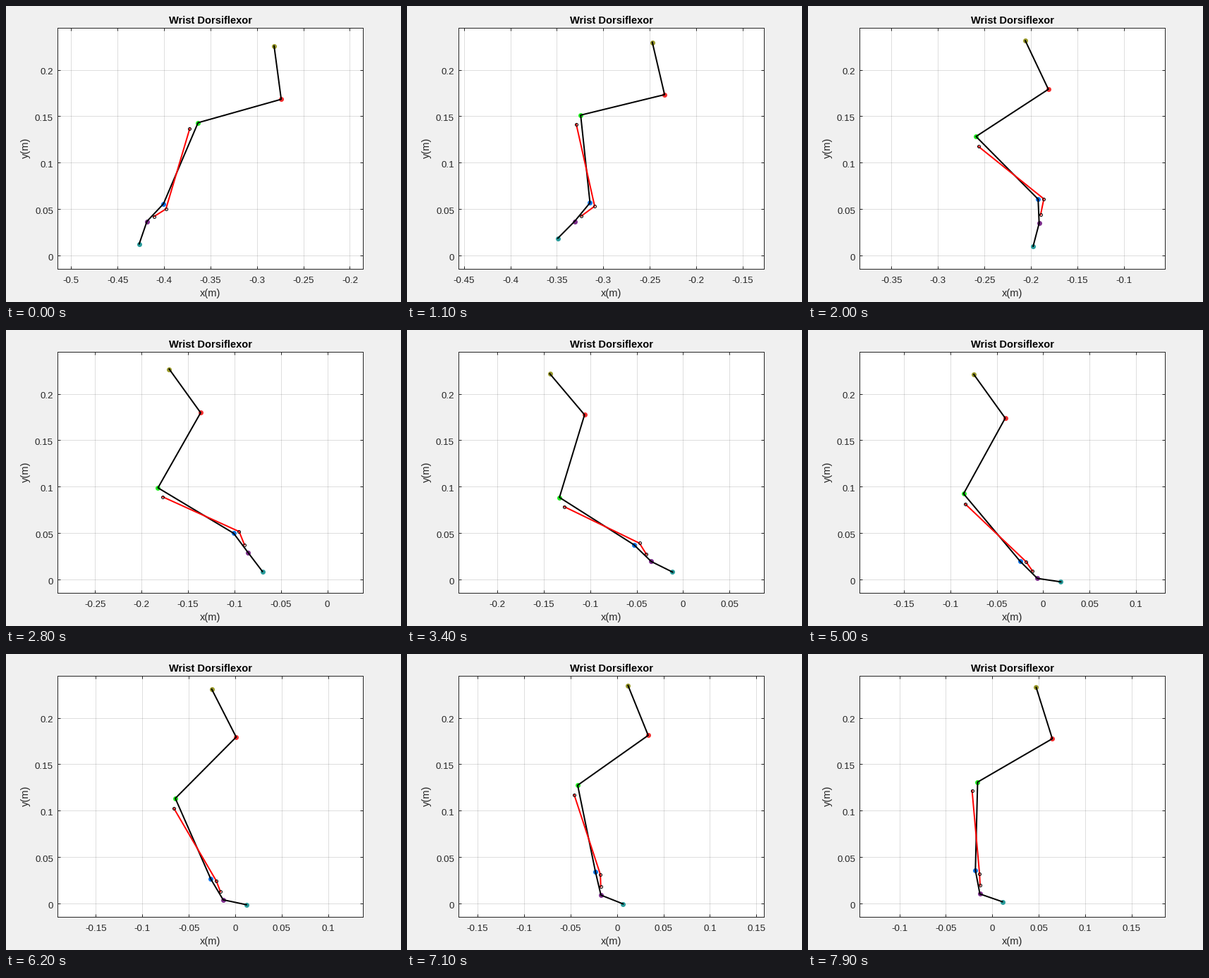
These frames come from a looping animation (560 px wide and 420 px high, 8000 ms). A matplotlib script:

```python
import numpy as np
import matplotlib.pyplot as plt
from matplotlib.animation import FuncAnimation
from matplotlib.ticker import FuncFormatter, MultipleLocator

W, H, DPI = 560, 420, 80
PT = 72 / DPI                     # points per pixel
LEFT, RIGHT, TOP, BOTTOM = 73, 506, 31, 373
SCALE, ZERO_Y = 1317, 354         # pixels per metre, pixel row of y = 0
SPAN = (RIGHT - LEFT) / SCALE
FRAMES, HOLD = 80, 4
STRIDE, STRIDE_LENGTH = 100, .4556    # frames and metres per stride
INK = (.15, .15, .15)


def wave(phase, mean, *harmonics):
    """Sum of harmonics of one stride, each an (amplitude, lag in degrees)."""
    return mean + sum(amp * np.cos(np.radians(360 * k * phase - lag))
                      for k, (amp, lag) in enumerate(harmonics, 1))


def step(start, length, deg):
    a = np.radians(deg)
    return start + length * np.array([np.cos(a), np.sin(a)])


def limb(t):
    """Joint positions and muscle path after t frames of the stride."""
    p = t / STRIDE
    shoulder = np.array([
        STRIDE_LENGTH * p + wave(p, -.2626, (.0187, 121), (.0017, 201)),
        wave(p, .1751, (.0036, 165), (.0052, 130))])
    scapula = wave(p, 113.6, (15.8, 142.5), (3.7, 200))
    arm = wave(p, 221.1, (24.6, 147.8), (11.2, 240), (3.6, 287))
    forearm = wave(p, 287.4, (41, 129.4), (13.6, 148), (3.2, 156))
    palm = wave(p, 282.5, (37.4, 166.5), (16.2, 219.5), (8.8, 219))
    digits = wave(p, 314.3, (52.2, 206.3), (27.8, 243.3), (9.9, 246.4))

    top = step(shoulder, .0579, scapula)
    elbow = step(shoulder, .0930, arm)
    wrist = step(elbow, .0950, forearm)
    knuckle = step(wrist, .0260, palm)
    tip = step(knuckle, .0256, digits)
    muscle = [step(elbow, .0110, forearm - 31.3),
              step(wrist, .0062, forearm + 48),
              step(knuckle, .0093, palm + 168)]
    return np.array([top, shoulder, elbow, wrist, knuckle, tip]), np.array(muscle)


plt.rcParams["font.family"] = "Liberation Sans"
fig = plt.figure(figsize=(W / DPI, H / DPI), dpi=DPI, facecolor="#f0f0f0")
ax = fig.add_axes([LEFT / W, 1 - BOTTOM / H,
                   (RIGHT - LEFT) / W, (BOTTOM - TOP) / H])
ax.set_ylim((ZERO_Y - BOTTOM) / SCALE, (ZERO_Y - TOP) / SCALE)
ax.xaxis.set_major_locator(MultipleLocator(.05))
ax.yaxis.set_major_locator(MultipleLocator(.05))
ax.xaxis.set_major_formatter(FuncFormatter(lambda v, _: f"{round(v, 2) + 0:g}"))
ax.set_axisbelow(True)
ax.grid(color=INK, alpha=.15, linewidth=PT)
ax.tick_params(direction="in", top=True, right=True, length=4.3 * PT, width=PT,
               color=INK, labelcolor=INK, labelsize=13.33 * PT,
               pad=11 * PT, labelleft=False)
for spine in ax.spines.values():
    spine.set(color=INK, linewidth=PT)

for v in np.arange(5) * .05:
    ax.text(-6 / (RIGHT - LEFT), v - 6.6 / SCALE, f"{v:.2g}", color=INK,
            transform=ax.get_yaxis_transform(), fontsize=13.33 * PT,
            ha="right", va="baseline")


def label(x, y, text, **kw):
    fig.text(x / W, 1 - y / H, text, fontsize=14.67 * PT, ha="center", **kw)


label(290, 25, "Wrist Dorsiflexor", weight="bold", color="black")
label(290, 412, "x(m)", color=INK)
label(28.2, 201, "y(m)", color=INK, rotation=90, va="center")

colors = ["#9a9a2b", "#f52f2f", "#22ee22", "#0a72e8", "#7e2f8e", "#2a9d9d"]
dots = [ax.plot([], [], "o", color=c, ms=7 * PT, mew=0)[0] for c in colors]
bones, = ax.plot([], [], color="black", lw=2 * PT)
cord, = ax.plot([], [], color="red", lw=2 * PT)
pins, = ax.plot([], [], "o", mfc="none", mec="black", ms=4 * PT, mew=PT)


def draw(frame):
    joints, muscle = limb(max(0, frame - HOLD))
    for dot, (x, y) in zip(dots, joints):
        dot.set_data([x], [y])
    bones.set_data(*joints.T)
    cord.set_data(*muscle.T)
    pins.set_data(*muscle.T)
    xs = np.concatenate([joints[:, 0], muscle[:, 0]])
    mid = (xs.min() + xs.max()) / 2
    ax.set_xlim(mid - SPAN / 2, mid + SPAN / 2)
    return [*dots, bones, cord, pins]


anim = FuncAnimation(fig, draw, frames=FRAMES, init_func=lambda: draw(0),
                     interval=100, repeat=True, repeat_delay=0, blit=False)
plt.show()
```
